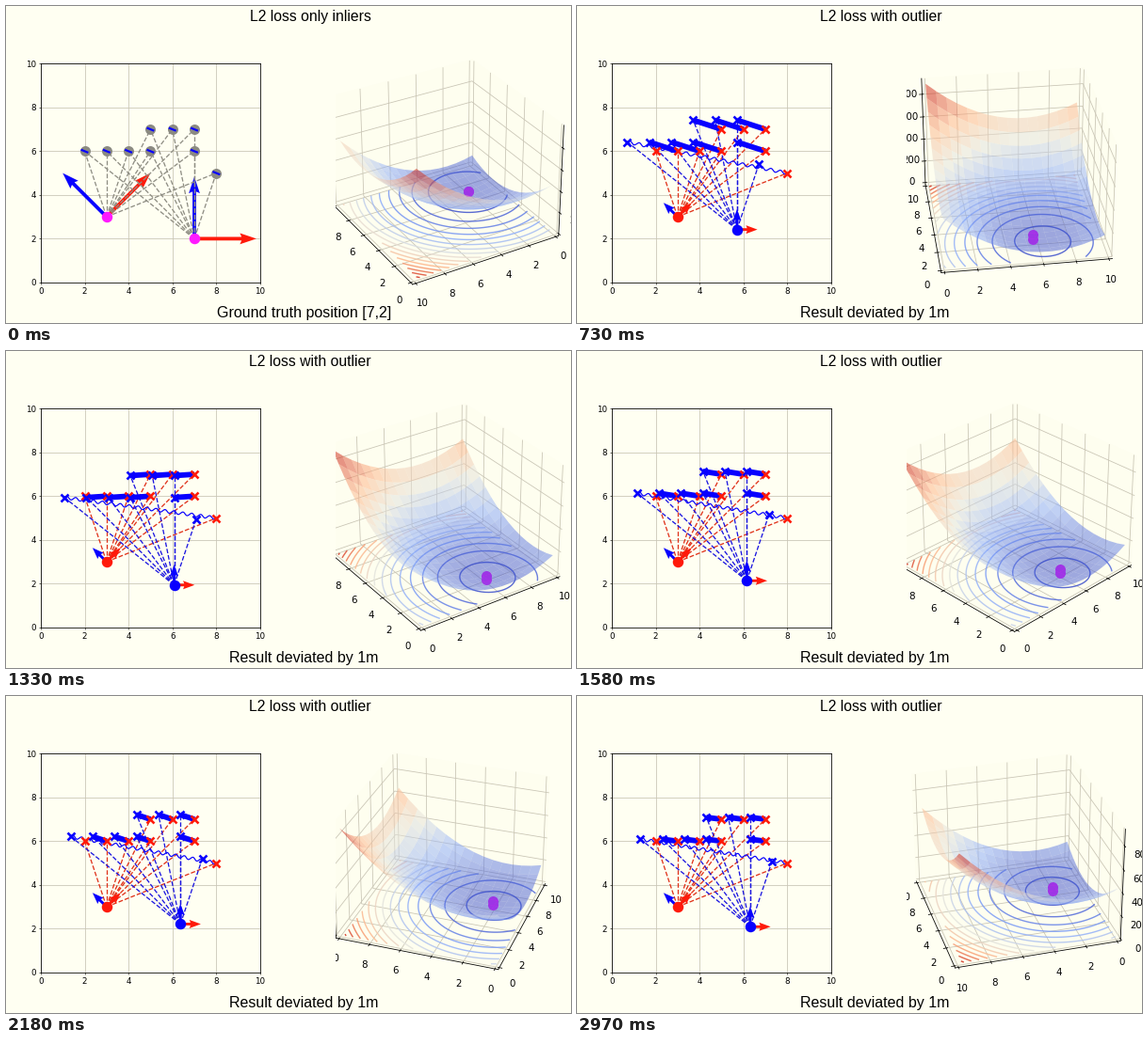
A matplotlib script that plays this animation: 600x337 px, repeating every 3000 ms.

```python
import numpy as np
import matplotlib.pyplot as plt
from matplotlib.animation import FuncAnimation
from matplotlib.collections import LineCollection
from matplotlib.colors import LinearSegmentedColormap
from matplotlib.patches import Rectangle

W, H, DPI = 600, 337, 72          # at 72 dpi one point is one pixel
STEP, FRAMES, CUT = 30, 100, 540  # ms, count, ms
PAPER, RED, BLUE, MAGENTA = "#fffff2", "#ff1a0a", "#0800ff", "#ff1aff"
HEAT = LinearSegmentedColormap.from_list(
    "heat", ["#3d50cc", "#86a8fc", "#e4e4de", "#ffb284", "#d02a18"])

plt.rcParams.update({
    "figure.facecolor": PAPER, "axes.facecolor": PAPER,
    "font.family": "DejaVu Sans", "grid.color": "#c9c5b5",
    "grid.linewidth": 0.8, "axes.axisbelow": True,
})
fig = plt.figure(figsize=(W / DPI, H / DPI), dpi=DPI)

marks = np.array([(2, 6), (3, 6), (4, 6), (5, 6), (7, 6),
                  (5, 7), (6, 7), (7, 7), (8, 5)], float)
base, truth = np.array([3.0, 3.0]), np.array([7.0, 2.0])

# offset of the estimated pose from the truth, settling over time
key_t = np.array([540, 990, 1320, 1780, 2550, 2970.0])
key_p = np.array([(-1.8, 1.0), (-0.31, -0.71), (-0.92, -0.06),
                  (-0.65, 0.2), (-0.69, 0.14), (-0.69, 0.09)])
slope = np.gradient(key_p, key_t, axis=0)
slope[0] = 0


def offset(t):
    k = int(np.clip(np.searchsorted(key_t, t) - 1, 0, len(key_t) - 2))
    h = key_t[k + 1] - key_t[k]
    s = np.clip((t - key_t[k]) / h, 0, 1)
    ease = s * s * (3 - 2 * s)
    return (key_p[k] * (1 - ease) + key_p[k + 1] * ease
            + h * s * (1 - s) * (slope[k] * (1 - s) - slope[k + 1] * s))


def box(x, y, w, h):
    return [x / W, 1 - (y + h) / H, w / W, h / H]


def plane():
    ax = fig.add_axes(box(36.9, 61.3, 233, 232.6), zorder=1)
    ax.set(xlim=(0, 10), ylim=(0, 10),
           xticks=range(0, 11, 2), yticks=range(0, 11, 2))
    ax.grid(True)
    ax.tick_params(labelsize=8.8, length=2.3, width=0.6, pad=2.3)
    for spine in ax.spines.values():
        spine.set_linewidth(0.8)
    return ax


def pairs(a, b):
    a, b = np.broadcast_arrays(a, b)
    return np.stack([a, b], axis=1)


def lines(ax, segs, color, lw, style="-", z=2):
    return ax.add_collection(LineCollection(
        segs, colors=color, linewidths=lw, linestyles=style, zorder=z))


def dots(ax, pts, color, marker="o", size=11, z=5, edge=0):
    pts = np.atleast_2d(pts)
    return ax.plot(pts[:, 0], pts[:, 1], ls="", marker=marker, ms=size,
                   color=color, mew=edge, zorder=z)[0]


def arrow(ax, at, vec, color, width, head):
    return ax.quiver(*at, *vec, color=color, angles="xy", scale_units="xy",
                     scale=1, units="dots", width=width, headwidth=3.1,
                     headlength=head, headaxislength=head * 0.9, zorder=4)


def bowl(center, floor):
    side, reach = 277.5, 9.75
    ax = fig.add_axes(box(465 - 0.5135 * side, 170.8 - 0.4865 * side,
                          side, side),
                      projection="3d", computed_zorder=False, zorder=0)

    def loss(x, y):
        return 9 * ((x - center[0]) ** 2 + (y - center[1]) ** 2) + floor

    top = loss(0, reach)
    fine = np.meshgrid(*[np.linspace(0, reach, 61)] * 2)
    ax.contour(*fine, loss(*fine), levels=np.arange(60, top, 60), zdir="z",
               offset=0, cmap=HEAT, linewidths=1.4, alpha=0.85, zorder=1)
    dot = ax.plot([0, 0], [0, 0], [0, 0], "o", color=MAGENTA, ms=11,
                  mew=0, zorder=2)[0]
    coarse = np.meshgrid(*[np.linspace(0, reach, 16)] * 2)
    ax.plot_surface(*coarse, loss(*coarse), cmap=HEAT, alpha=0.5,
                    linewidth=0.2, zorder=3)

    ax.set_xticks(range(0, 11, 2))
    ax.set_yticks(range(0, 11, 2))
    ax.set_zticks(range(0, int(top), 200))
    pad = 1 / 48
    ax.set_xlim(-10 * pad, 10 + 10 * pad)
    ax.set_ylim(-10 * pad, 10 + 10 * pad)
    ax.set_zlim(-top * pad, top + top * pad)
    ax.tick_params(labelsize=10.2)
    for axis in (ax.xaxis, ax.yaxis, ax.zaxis):
        axis.set_pane_color("#fefeef")

    def place(p):
        dot.set_data_3d([p[0]] * 2, [p[1]] * 2, [0, loss(*p)])

    return ax, place


# inliers only
flat_in = plane()
for p in (base, truth):
    lines(flat_in, pairs(p, marks), "#8f8e84", 1.3, "--", 4.5)
dots(flat_in, marks, "#8b8a82", z=4.6)
ticks_in = lines(flat_in, pairs(marks, marks), BLUE, 2.2, z=4.7)
dots(flat_in, [base, truth], MAGENTA, size=11.5)
reach = 2 * np.sqrt(2)
for at, vec, color in ((base, (2, 2), RED), (base, (-2, 2), BLUE),
                       (truth, (reach, 0), RED), (truth, (0, reach), BLUE)):
    arrow(flat_in, at, vec, color, 3.8, 4.6)
bowl_in, place_in = bowl(truth, 0)
place_in(truth)

# one wrong match
flat_out = plane()
lines(flat_out, pairs(base, marks), "#e0321a", 1.3, "--")
rays = lines(flat_out, pairs(base, marks), "#1a14e0", 1.3, "--")
errors = lines(flat_out, pairs(marks, marks), BLUE, 5.8, z=3)
wave = flat_out.plot([], [], color=BLUE, lw=1.2, zorder=3)[0]
dots(flat_out, marks, RED, "x", 8.8, 4, 2.6)
seen = dots(flat_out, marks, BLUE, "x", 8.8, 4, 2.6)
dots(flat_out, base, RED, size=11.5)
pose_dot = dots(flat_out, truth, BLUE, size=11.5)
for vec, color in (((0.64, 0.64), RED), ((-0.64, 0.64), BLUE)):
    arrow(flat_out, base, vec, color, 2.9, 4.2)
pose_axes = [arrow(flat_out, truth, (0.93, 0), RED, 2.9, 4.2),
             arrow(flat_out, truth, (0, 0.93), BLUE, 2.9, 4.2)]
bowl_out, place_out = bowl((6.31, 2.1), 33)

# the surface view is cropped on its left
fig.add_artist(Rectangle((0, 0), 350 / W, 1, color=PAPER, lw=0, zorder=0.5))
label = dict(family="Liberation Sans", ha="center", va="baseline")
title = fig.text(323 / W, 1 - 15.6 / H, "", size=15.8, **label)
note = fig.text(316.5 / W, 1 - 330.5 / H, "", size=16, **label)


def wiggle(a, b):
    s = np.linspace(0, 1, 200)[:, None]
    d = b - a
    normal = np.array([-d[1], d[0]]) / np.hypot(*d)
    return a + s * d + 0.07 * np.sin(2 * np.pi * 17 * s) * normal


def draw_inliers(t):
    turn = np.radians(-22 + 49 * t / 450)
    half = 0.18 * np.array([np.cos(turn), np.sin(turn)])
    ticks_in.set_segments(pairs(marks - half, marks + half))
    bowl_in.view_init(30, 149.5 - 0.0449 * t)


def draw_outlier(t):
    shift = offset(t)
    pose, moved = truth + shift, marks + shift
    rays.set_segments(pairs(pose, moved))
    errors.set_segments(pairs(moved, marks)[1:-1])
    wave.set_data(*wiggle(moved[0], marks[-1]).T)
    seen.set_data(*moved.T)
    pose_dot.set_data([pose[0]], [pose[1]])
    for q in pose_axes:
        q.set_offsets([pose])
    place_out(pose)
    bowl_out.view_init(30, -110.5 - 0.0435 * (t - 1000))


def draw(i):
    t = i * STEP
    clean = t < CUT
    for ax in (flat_in, bowl_in):
        ax.set_visible(clean)
    for ax in (flat_out, bowl_out):
        ax.set_visible(not clean)
    if clean:
        title.set_text("L2 loss only inliers")
        note.set_text("Ground truth position [7,2]")
        draw_inliers(t)
    else:
        title.set_text("L2 loss with outlier")
        note.set_text("Result deviated by 1m")
        draw_outlier(t)
    return []


anim = FuncAnimation(fig, draw, frames=FRAMES, interval=STEP,
                     repeat=True, repeat_delay=0, blit=False)
plt.show()
```
